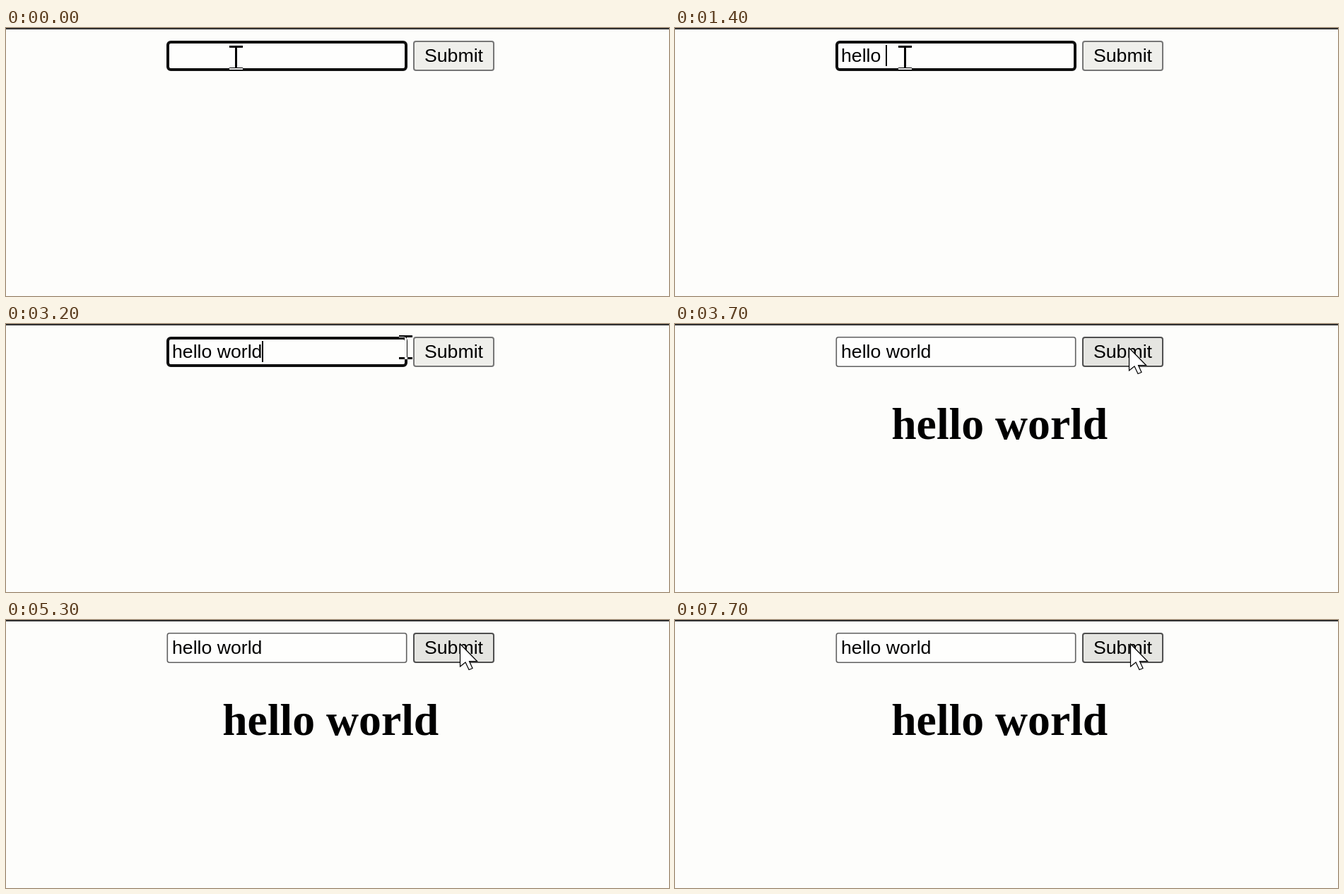
Recreate the animation shown at these times as an HTML page with a canvas. Size 938x380 px, loop 7.8 s.

```html
<!DOCTYPE html>
<html lang="en">
<head>
<meta charset="utf-8">
<title>Form demo</title>
<style>
html, body { margin: 0; width: 100%; height: 100%; overflow: hidden; background: #fdfdfb; }
canvas { display: block; }
</style>
</head>
<body>
<canvas id="stage" width="938" height="380"></canvas>
<script>
const ctx = document.getElementById('stage').getContext('2d');
const LOOP = 7800, STEP = 100;
const TEXT = 'hello world';
const UI_FONT = '26.67px "Liberation Sans", Arial, sans-serif';
const HEAD_FONT = 'bold 63.7px "Liberation Serif", "Times New Roman", serif';
const TYPE_START = 600, TYPE_GAP = 145;
const TYPE_END = TYPE_START + TYPE_GAP * (TEXT.length - 1);
const PRESS = 3500, RELEASE = 3600;

// time, x, y
const path = [
  [2500, 325, 42], [2700, 362, 31], [2950, 462, 17],
  [3200, 565, 33], [3400, 642, 34], [7400, 642, 34], [7500, 644, 34]
];

function pointer(t) {
  if (t <= path[0][0]) return path[0].slice(1);
  for (let i = 1; i < path.length; i++) {
    const [t0, x0, y0] = path[i - 1], [t1, x1, y1] = path[i];
    if (t <= t1) {
      const k = (t - t0) / (t1 - t0);
      return [x0 + (x1 - x0) * k, y0 + (y1 - y0) * k].map(Math.round);
    }
  }
  return path[path.length - 1].slice(1);
}

function box(x, y, w, h, r, line, stroke, fill) {
  const d = line / 2;
  ctx.beginPath();
  ctx.roundRect(x + d, y + d, w - line, h - line, r);
  ctx.fillStyle = fill;
  ctx.fill();
  ctx.lineWidth = line;
  ctx.strokeStyle = stroke;
  ctx.stroke();
}

function label(str, x, y, font) {
  ctx.font = font;
  ctx.fillStyle = '#000';
  ctx.fillText(str, x, y);
}

function caretOn(t) {
  if (t < TYPE_START) return t >= 300;
  if (t < TYPE_END) return true;
  return Math.floor((t - TYPE_END) / 500) % 2 === 0;
}

function drawInput(t) {
  const focused = t < PRESS;
  if (focused) box(227, 18, 341, 43, 4, 4, '#101010', '#fefefd');
  else box(227.5, 18, 340, 43, 3, 1.6, '#606060', '#fefefd');

  const count = Math.max(0, Math.min(TEXT.length, Math.floor((t - TYPE_START) / TYPE_GAP) + 1));
  const typed = TEXT.slice(0, count);
  label(typed, 235, 48, UI_FONT);
  if (focused && caretOn(t)) {
    ctx.fillRect(Math.floor(235 + ctx.measureText(typed).width), 24, 2, 30);
  }
}

function drawButton(t, hover) {
  const down = t >= PRESS && t < RELEASE;
  const fill = down ? '#f5f5f3' : hover ? '#e5e5e1' : '#efefeb';
  box(576, 18, 115, 43, 3, 2, hover ? '#4f4f4f' : '#767676', fill);
  label('Submit', 592, 48, UI_FONT);
}

function drawBeam(x, y) {
  // inverts whatever lies beneath
  ctx.globalCompositeOperation = 'difference';
  ctx.fillStyle = '#fff';
  ctx.fillRect(x - 9, y - 17, 19, 3);
  ctx.fillRect(x - 1, y - 14, 3, 28);
  ctx.fillRect(x - 9, y + 14, 19, 3);
  ctx.globalCompositeOperation = 'source-over';
}

function drawArrow(x, y) {
  ctx.save();
  ctx.translate(x + 0.5, y);
  ctx.beginPath();
  [[0, 0], [0, 32], [7.5, 26], [12.5, 36.5], [17.5, 34.5], [13, 24.5], [24, 24.5]]
    .forEach(([px, py]) => ctx.lineTo(px, py));
  ctx.closePath();
  ctx.fillStyle = '#fff';
  ctx.fill();
  ctx.lineWidth = 1.2;
  ctx.strokeStyle = '#000';
  ctx.stroke();
  ctx.restore();
}

function draw(t) {
  ctx.fillStyle = '#fdfdfb';
  ctx.fillRect(0, 0, 938, 380);
  ctx.fillStyle = '#303030';
  ctx.fillRect(0, 0, 938, 2);

  const [x, y] = pointer(t);
  drawInput(t);
  drawButton(t, x >= 576);
  if (t >= RELEASE) label(TEXT, 306.2, 163, HEAD_FONT);
  if (x < 568) drawBeam(x, y);
  else drawArrow(x, y);
}

function tick() {
  const t = performance.now() % LOOP;
  draw(Math.floor(t / STEP) * STEP);
  requestAnimationFrame(tick);
}
tick();
</script>
</body>
</html>
```
